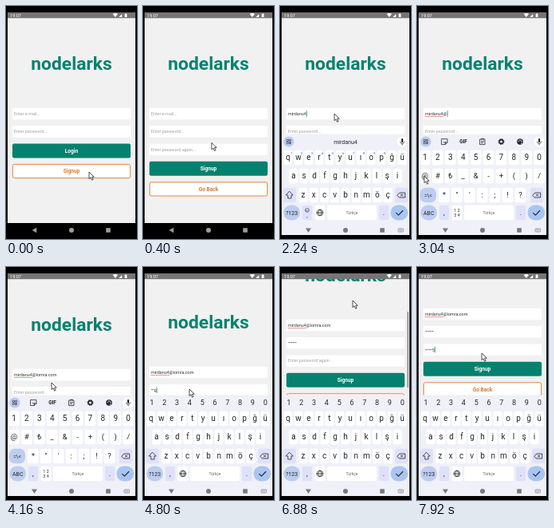
An HTML page that plays this animation: 164 px wide and 292 px high, repeating every 8000 ms.

```html
<!DOCTYPE html>
<html lang="en">
<head>
<meta charset="utf-8">
<title>Signup form</title>
<style>
html, body { margin: 0; width: 100%; height: 100%; overflow: hidden; background: #000; }
svg { display: block; width: 100vw; height: 100vh; font-family: Roboto, Arial, sans-serif; }
</style>
</head>
<body>
<svg id="stage" viewBox="0 0 164 292"></svg>
<script>
const LOOP = 8000;
const TEAL = '#05826f', ORANGE = '#df7a30', INK = '#25262b', PAPER = '#f1f1f1';
const BOARD = '#eff0f8', SOFT = '#dfe1fa', BLUE = '#bccdf0';
const USER = 'mirdanu4', MAIL = USER + '@lomra.com', SECRET = 'asg345';

// ---------- drawing helpers ----------
const rect = (x, y, w, h, fill, r = 0, more = '') =>
  `<rect x="${x}" y="${y}" width="${w}" height="${h}" rx="${r}" fill="${fill}" ${more}/>`;
const text = (x, y, s, size, fill, more = '') =>
  `<text x="${x}" y="${y}" font-size="${size}" fill="${fill}" ${more}>${s.replace(/&/g, '&amp;').replace(/</g, '&lt;')}</text>`;
const mid = (x, y, s, size, fill, more = '') => text(x, y, s, size, fill, 'text-anchor="middle" ' + more);
const line = (d, color = INK, w = 0.8, more = '') =>
  `<path d="${d}" fill="none" stroke="${color}" stroke-width="${w}" stroke-linejoin="round" stroke-linecap="round" ${more}/>`;
const group = (id, body, more = '') => `<g id="${id}" ${more}>${body}</g>`;
const key = (cx, cy, w, s, size = 10, fill = '#fff', r = 2.4) =>
  rect(cx - w / 2, cy - 9.3, w, 18.6, fill, r) + mid(cx, cy + 3.3, s, size, INK);

// ---------- app pages ----------
const ROW = 22.3;
const field = (id, y, hint) =>
  rect(8, y - 7.2, 148, 14.4, '#fff', 1) +
  text(10, y + 1.9, hint, 5.4, '#a3a3a3', `id="${id}Hint"`) +
  text(10, y + 1.9, '', 5.4, '#333', `id="${id}Text"`) +
  rect(0, y - 3.8, 0.7, 7.6, '#12806f', 0, `id="${id}Caret" visibility="hidden"`);
const filled = (y, s) => rect(8, y - 9, 148, 18, TEAL, 2) + mid(82, y + 2.3, s, 6.6, '#fff', 'font-weight="700"');
const outlined = (y, s) =>
  rect(8.4, y - 8.6, 147.2, 17.2, '#fff', 2, `stroke="${ORANGE}" stroke-width="0.9"`) +
  mid(82, y + 2.3, s, 6.6, ORANGE, 'font-weight="700"');
const base = rect(2, 8, 160, 400, PAPER) + mid(82, 80, 'nodelarks', 22.8, TEAL, 'font-weight="700"');

const login = base + field('inMail', 135, 'Enter e-mail...') + field('inPass', 135 + ROW, 'Enter password...') +
  filled(181.4, 'Login') + outlined(207, 'Signup');
const signup = base + field('mail', 135, 'Enter e-mail...') + field('pass', 135 + ROW, 'Enter password...') +
  field('again', 135 + 2 * ROW, 'Enter password again...') +
  line('M10 138.6H32.8', '#e0473e', 0.6, 'id="squiggle" visibility="hidden"') +
  filled(203.8, 'Signup') + outlined(229.4, 'Go Back');

// ---------- keyboard ----------
const rowOf = (chars, x, step, y, w, size) =>
  [...chars].map((c, i) => key(x + i * step, y, w, c, size)).join('');
const backspace = x => key(x, 237, 16, '', 1, SOFT) +
  line(`M${x - 5} 237l2.6-3h7v6h-7zM${x - 0.8} 235.7l2.6 2.6m0-2.6l-2.6 2.6`);
const shift = key(12, 237, 16, '', 1, SOFT) + line('M12 232.5l4.3 4.5h-2.2v4h-4.2v-4H7.7z');
const letters = rowOf('qwertyuıopğü', 10, 13, 190, 11.2, 10) + rowOf('asdfghjklşi', 17, 13, 213, 11.2, 10) +
  shift + rowOf('zxcvbnmöç', 29, 13.25, 237, 11.2, 10) + backspace(152);
const bottom = mode => rect(4.5, 249.5, 20.5, 19, BLUE, 9) + mid(14.7, 261.8, mode, 7, INK) +
  key(34, 259, 12.5, '', 1, SOFT) + key(50, 259, 13, '', 1) +
  rect(59, 249.7, 62, 18.6, '#fff', 2.4) + mid(90, 261, 'Türkçe', 5, '#6a6b70') +
  key(130, 259, 12.5, '.', 9, SOFT) + rect(138.5, 249.5, 21.5, 19, '#a9c5f2', 9) +
  line('M145.5 259.3l2.8 2.8 5.4-5.6', INK, 1.1);
const comma = mid(34, 262, ',', 9, INK);
const globe = line('M46.2 259a3.8 3.8 0 1 0 7.6 0a3.8 3.8 0 1 0-7.6 0M46.2 259h7.6M50 255.2c-2.6 2-2.6 5.6 0 7.6c2.6-2 2.6-5.6 0-7.6');
const smile = line('M31.6 256a2.4 2.4 0 1 0 4.8 0a2.4 2.4 0 1 0-4.8 0M33 256.6q1 1 2 0', INK, 0.6) + mid(34, 265, ',', 7, INK);
const hints = [...'1234567890'].map((c, i) => mid(14 + i * 13, 185.5, c, 4, '#555')).join('');

const plainKeys = letters + hints + bottom('?123') + smile + globe;
const symbolKeys = rowOf('1234567890', 10, 15.9, 190, 13.8, 10) + rowOf('@#₺_&-+()/', 10, 15.9, 213, 13.8, 9.5) +
  key(14, 237, 20, '=\\<', 6.5, BLUE, 7) + rowOf('*"\':;!?', 34, 15.9, 237, 13.8, 9.5) + backspace(150) +
  bottom('ABC') + comma + mid(50, 258.4, '1 2', 5.4, INK) + mid(50, 264.2, '3 4', 5.4, INK);
const numberKeys = [...'1234567890'].map((c, i) => mid(11 + i * 15.8, 173.3, c, 9, INK)).join('') +
  letters + bottom('?123') + comma + globe;

const ends = `<circle cx="11" cy="170" r="6.6" fill="${BLUE}"/>` +
  [[8.3, 167.3], [11.5, 167.3], [8.3, 170.5]].map(p => rect(p[0], p[1], 2.2, 2.2, 'none', 0.4, `stroke="${INK}" stroke-width="0.6"`)).join('') +
  line('M12.6 170.4v2.6M11.3 171.7h2.6', INK, 0.7) +
  '<circle cx="153" cy="170" r="6.6" fill="#fff"/>' + rect(151.9, 166, 2.2, 5, INK, 1.1) +
  line('M150.5 170a2.5 2.5 0 0 0 5 0M153 172.6v1.6', INK, 0.7);
const gear = '<circle cx="105.5" cy="170" r="2.4" fill="none" stroke="#25262b" stroke-width="1.7"/>' +
  '<circle cx="105.5" cy="170" r="3.5" fill="none" stroke="#25262b" stroke-width="1" stroke-dasharray="1.4 1.35"/>';
const palette = `<circle cx="129" cy="170" r="3.8" fill="${INK}"/>` +
  [[-1.8, -0.4], [-0.7, -1.9], [1.1, -1.7], [2, 0], [1.8, 2.4]].map(p =>
    `<circle cx="${129 + p[0]}" cy="${170 + p[1]}" r="0.7" fill="${BOARD}"/>`).join('');
const tools = line('M31 166.6h7v4.4l-2.6 2.6H31zM38 171h-2.6v2.6M33 170.6q1.4 1.4 2.8 0', INK, 0.8) +
  mid(58, 172.3, 'GIF', 6.4, INK, 'font-weight="700"') +
  line('M79 167h6v6.6h-6zM80.6 167v-0.8h2.8v0.8M80.4 169.6h3.2M80.4 171.4h2.2', INK, 0.8) + gear + palette;

const keyboard = rect(2, 160.5, 160, 111.5, BOARD) + group('bar', ends) + group('tools', tools) +
  mid(82, 172.6, '', 7, INK, 'id="suggest"') +
  group('plain', plainKeys) + group('symbols', symbolKeys) + group('numbers', numberKeys);

// ---------- system chrome ----------
const status = rect(2, 8, 160, 7.2, '#757575') + text(5, 13.7, '19:07', 5.6, '#fff') +
  '<path d="M133.6 10q3.2-1.8 6.4 0l-3.2 3.9zM141.2 13.9l4-4v4zM148.6 9.9h.8v-.6h1.2v.6h.8v4h-2.8z" fill="#fff"/>';
const nav = rect(2, 272, 160, 15, '#000', 0, 'id="navBack"') +
  group('navIcons', '<path id="backIcon"/><circle cx="82" cy="281" r="3"/>' + rect(125.2, 278.2, 5.6, 5.6, 'inherit', 0.4).replace('fill="inherit"', '')) +
  group('swap', rect(148, 279, 6.4, 4, 'none', 0.6, 'stroke="#77787d" stroke-width="0.7"') + line('M149.4 280.4h3.6M150 281.8h2.4', '#77787d', 0.5));
const arrow = '<path id="cursor" d="M0 0V8.6L2 6.8 3.5 10.2 5.1 9.5 3.6 6.2H6.3Z" fill="#fff" stroke="#222" stroke-width="0.8" stroke-linejoin="round"/>';

document.getElementById('stage').innerHTML =
  '<clipPath id="view"><rect x="2" y="15" width="160" height="257"/></clipPath>' +
  '<clipPath id="screen"><rect x="2" y="8" width="160" height="264"/></clipPath>' +
  rect(0, 0, 164, 292, '#000') + rect(2, 8, 160, 264, PAPER) +
  `<g clip-path="url(#view)">${group('scroll', group('login', login) + group('signup', signup))}` +
  rect(159.3, 15, 1.6, 95, '#8d8d8d', 0, 'id="thumb"') + '</g>' +
  `<g clip-path="url(#screen)">${group('keyboard', keyboard)}</g>` + status + nav + arrow;

// ---------- timeline ----------
const el = {};
document.querySelectorAll('[id]').forEach(n => el[n.id] = n);
const set = (id, name, v) => el[id].setAttribute(name, v);
const show = (id, on) => set(id, 'visibility', on ? 'visible' : 'hidden');
const ramp = (t, a, b) => Math.min(1, Math.max(0, (t - a) / (b - a)));
const ease = u => u * u * (3 - 2 * u);

function along(track, t) {
  let i = 0;
  while (i < track.length - 2 && t >= track[i + 1][0]) i++;
  const [a, b] = [track[i], track[i + 1]], u = ease(ramp(t, a[0], b[0]));
  return a.slice(1).map((v, k) => v + (b[k + 1] - v) * u);
}

const pointer = [
  [0, 104, 208], [160, 104, 208], [640, 68, 135], [2260, 68, 135], [2560, 14, 266], [2720, 14, 266],
  [2960, 9, 213], [3600, 9, 213], [4160, 57, 145], [4300, 58, 153], [5400, 58, 153], [6240, 92, 105],
  [6400, 92, 105], [6880, 91, 42], [7040, 91, 46], [7400, 81, 108], [8000, 81, 108]
];
const scrolling = [[0, 0], [4320, 0], [4400, 3], [6400, 3], [6880, 62], [7040, 76], [8000, 76]];

const mailKeys = [1000, 1080, 1160, 1240, 1320, 1400, 1500, 1670, 3010, 3090, 3170, 3250, 3330, 3410, 3490, 3570, 3650, 3730];
const passKeys = [4540, 4660, 4780, 4980, 5160, 5360];
const againKeys = [7480, 7560, 7640, 7720, 7800, 7890];
const typed = (keys, t) => keys.filter(k => t >= k).length;

function masked(keys, t) {
  const n = typed(keys, t);
  if (!n) return '';
  return '•'.repeat(n - 1) + (t - keys[n - 1] < 700 ? SECRET[n - 1] : '•');
}

function fill(id, s, keys, t, focused) {
  el[id + 'Text'].textContent = s;
  show(id + 'Hint', !s);
  const last = keys[typed(keys, t) - 1];
  const lit = (t + 780) % 1000 < 500 || t - last < 160;
  show(id + 'Caret', focused && lit);
  set(id + 'Caret', 'x', 10.2 + (s ? el[id + 'Text'].getComputedTextLength() : 0));
}

function draw(t) {
  const [px, py] = along(pointer, t), [s] = along(scrolling, t);
  set('cursor', 'transform', `translate(${px} ${py})`);
  set('scroll', 'transform', `translate(0 ${-s})`);
  set('signup', 'opacity', ramp(t, 120, 340));
  set('thumb', 'y', 15.5 + s * 145 / 221);
  set('thumb', 'opacity', Math.max(ramp(t, 4320, 4360) * (1 - ramp(t, 4520, 4760)), ramp(t, 6400, 6450) * (1 - ramp(t, 7150, 7400))));

  fill('mail', MAIL.slice(0, typed(mailKeys, t)), mailKeys, t, t >= 720 && t < 4320);
  fill('pass', masked(passKeys, t), passKeys, t, t >= 4320 && t < 7400);
  fill('again', masked(againKeys, t), againKeys, t, t >= 7400);
  show('squiggle', t >= 3010);

  set('keyboard', 'transform', `translate(0 ${112 * (1 - ease(ramp(t, 700, 920)))})`);
  const symbols = t >= 2600 && t < 4360, numbers = t >= 4360;
  const suggesting = t >= 1000 && t < 3020;
  show('plain', t < 2600);
  show('symbols', symbols);
  show('numbers', numbers);
  show('bar', !numbers);
  show('tools', !numbers && !suggesting);
  el.suggest.textContent = suggesting ? USER.slice(0, t < 1840 ? Math.min(7, typed(mailKeys, t)) : 8) : '';

  const light = t >= 940;
  set('navBack', 'fill', light ? BOARD : '#000');
  set('navIcons', 'fill', light ? '#77787d' : '#9b9b9b');
  set('backIcon', 'd', t >= 860 ? 'M32 278.4h7l-3.5 5.6z' : 'M38.3 277.7v6.6l-5.8-3.3z');
  show('swap', light);
}

function tick(now) {
  draw(now % LOOP);
  requestAnimationFrame(tick);
}
draw(0);
requestAnimationFrame(tick);
</script>
</body>
</html>
```
